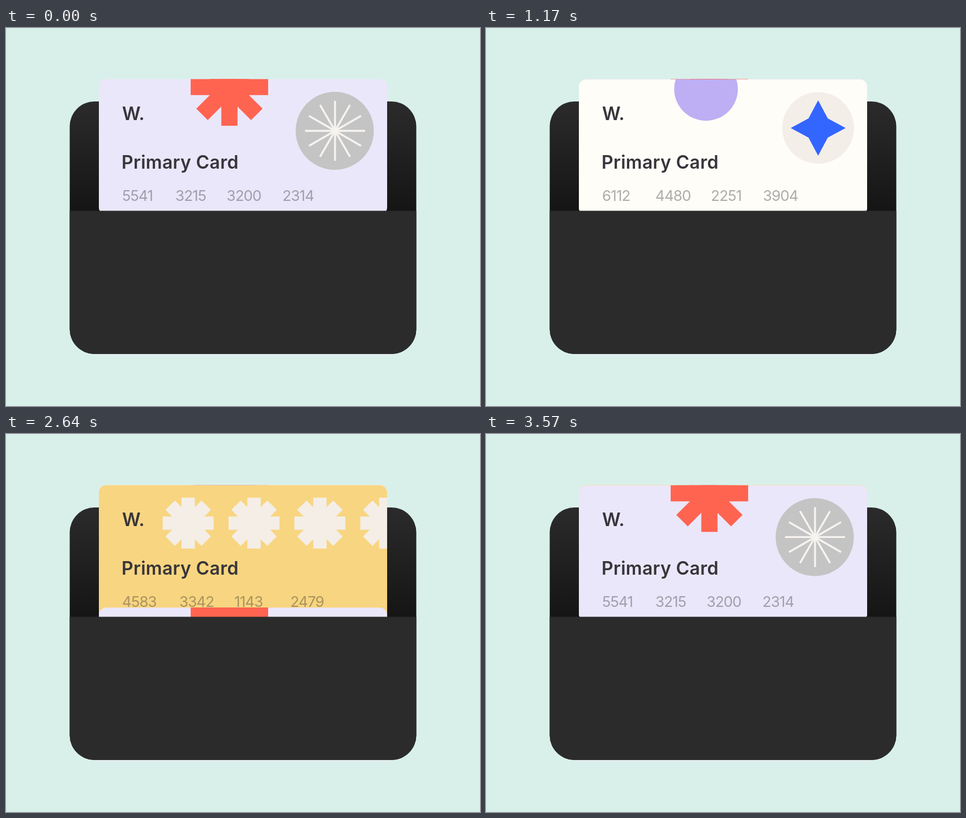
Recreate the animation shown at these times as an HTML page. Size 837 px wide and 669 px high, loop 3600 ms.

```html
<!DOCTYPE html>
<html lang="en">
<head>
<meta charset="utf-8">
<title>Card wallet</title>
<style>
  html, body { margin: 0; width: 100%; height: 100%; overflow: hidden; background: #d9f0ea; }
  svg { display: block; width: 837px; height: 669px; }
  text { font-family: Inter, sans-serif; fill: #37353a; }
  .title { font-size: 32px; font-weight: 600; }
  .number { font-size: 26px; letter-spacing: -.9px; fill: #2b2b2b; fill-opacity: .38; }
</style>
</head>
<body>
<svg viewBox="0 0 837 669">
  <defs>
    <linearGradient id="inside" x1="0" y1="130" x2="0" y2="323" gradientUnits="userSpaceOnUse">
      <stop stop-color="#2b2b2b"/>
      <stop offset="1" stop-color="#151515"/>
    </linearGradient>
    <clipPath id="edge"><rect x="164" y="90.3" width="509" height="240"/></clipPath>
  </defs>
  <rect x="160" y="570" width="517" height="10.5" fill="#e3ecee"/>
  <rect x="112.5" y="130" width="612" height="447" rx="44" fill="url(#inside)"/>
  <g id="cards"></g>
  <path d="M112.5 323.5H724.5V533a44 44 0 0 1-44 44H156.5a44 44 0 0 1-44-44Z" fill="#2b2b2b"/>
</svg>
<script>
const LOOP = 3600, TRAVEL = 242;

const repeat = (n, draw) => Array.from({ length: n }, (_, i) => draw(i)).join('');

const circle = (x, y, r, fill) => `<circle cx="${x}" cy="${y}" r="${r}" fill="${fill}"/>`;

// Bars through a shared centre, spread evenly over half a turn
const burst = (x, y, bars, reach, width, color) => repeat(bars, i =>
  `<path d="M${-reach} 0H${reach}" transform="translate(${x} ${y}) rotate(${i * 180 / bars})"
    stroke="${color}" stroke-width="${width}"/>`);

const card = (fill, art, numbers, columns) => `<g>
  <rect x="164" y="90.5" width="509" height="240" rx="13" fill="${fill}"/>
  <g clip-path="url(#edge)">${art}</g>
  <text class="title" x="205" y="163">W.</text>
  <text class="title" x="204" y="248.5" letter-spacing=".3">Primary Card</text>
  ${numbers.split(' ').map((n, i) => `<text class="number" x="${columns[i]}" y="306">${n}</text>`).join('')}
</g>`;

const lilac = card('#ebe7fa',
  burst(394.5, 104.5, 4, 68.4, 28.6, '#ff6451') +
  circle(580.5, 182, 69, '#c4c4c4') +
  burst(581, 182, 6, 53, 3.4, '#f7f4f0'),
  '5541 3215 3200 2314', [205, 299, 389.5, 488]);

const white = card('#fffdf8',
  circle(388.5, 107.5, 56.2, '#beaef3') +
  circle(586.5, 176.5, 63.4, '#f4eee8') +
  '<path d="M586.5 127.5l17 32 31.5 17-31.5 17-17 32-17-32-31.5-17 31.5-17z" fill="#3366ff"/>',
  '6112 4480 2251 3904', [205, 299, 397, 489]);

const yellow = card('#f8d580',
  repeat(4, i => burst(321.7 + i * 116.3, 157.8, 4, 45, 23.6, '#f4eee7')),
  '4583 3342 1143 2479', [205, 306, 403, 502]);

const cards = document.getElementById('cards');
cards.innerHTML = lilac + white + yellow + lilac;

const slides = [[15, 1200], [1230, 2400], [2400, 3600]];

function frame() {
  const t = performance.now() % LOOP;
  slides.forEach(([start, end], i) => {
    const p = Math.min(1, Math.max(0, (t - start) / (end - start)));
    const eased = p * p * (3 - 2 * p);
    cards.children[i + 1].setAttribute('transform', `translate(0 ${TRAVEL * (1 - eased)})`);
  });
  requestAnimationFrame(frame);
}
frame();
</script>
</body>
</html>
```
